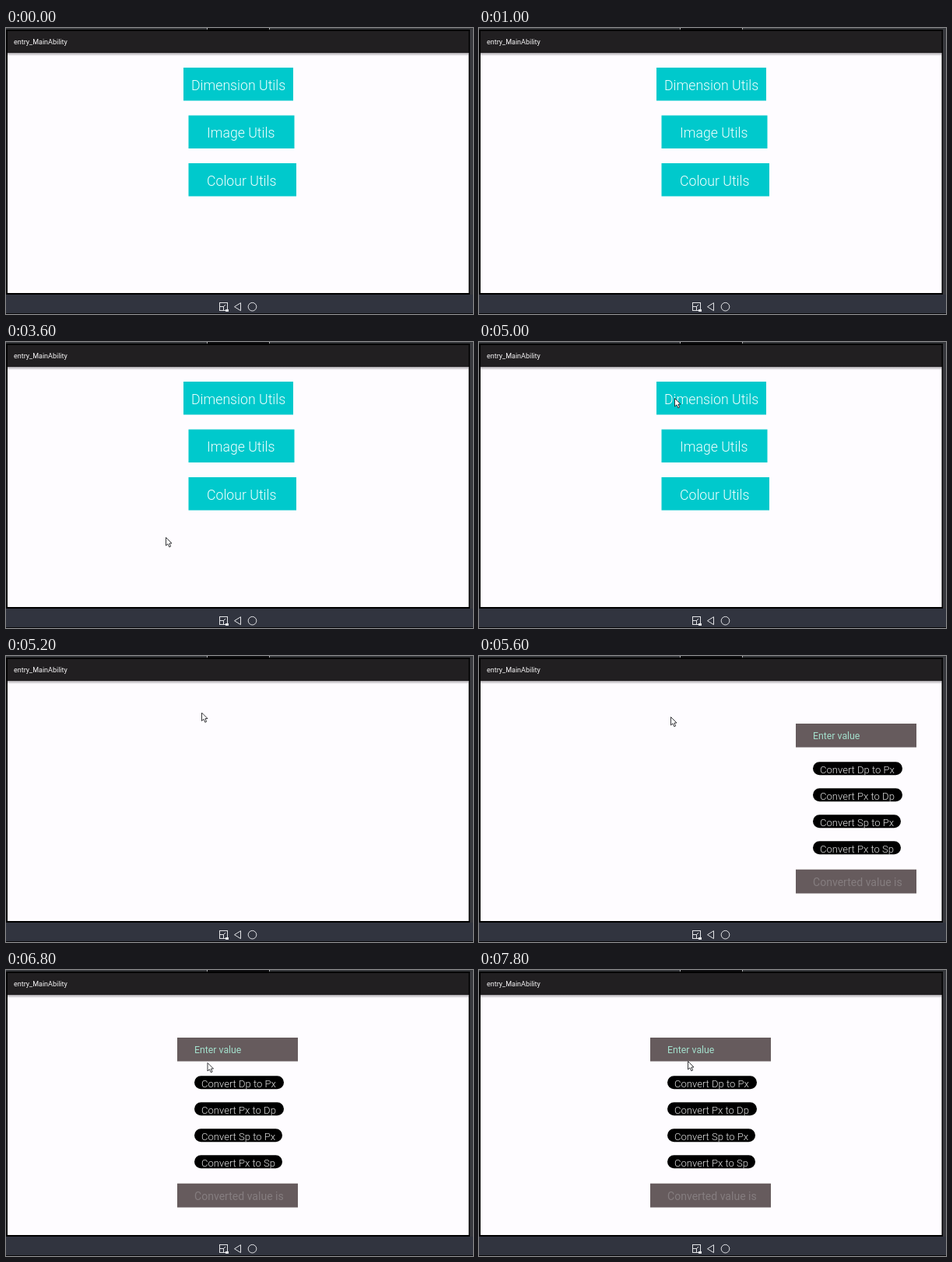
Recreate the animation shown at these times as an HTML page with a canvas. Size 600 px wide and 368 px high, loop 8000 ms.

```html
<!DOCTYPE html>
<html lang="en">
<head>
<meta charset="utf-8">
<title>Utility menu</title>
<style>
html, body { margin: 0; width: 100%; height: 100%; overflow: hidden; background: #31343f; }
canvas { display: block; width: 600px; height: 368px; }
</style>
</head>
<body>
<canvas id="stage"></canvas>
<script>
const LOOP = 8000, STEP = 200;
const MENU_END = 5200, PAGE_START = 5600, PAGE_REST = 5800;
const canvas = document.getElementById('stage');
const ctx = canvas.getContext('2d');
const ratio = window.devicePixelRatio || 1;
canvas.width = 600 * ratio;
canvas.height = 368 * ratio;

// Pointer tip: time, x, y
const path = [
  [2800, 61, 352], [3200, 150, 296], [3600, 205, 251], [4000, 207, 240],
  [4600, 240, 120], [5000, 251, 72], [5400, 251, 73], [5600, 246, 78],
  [6200, 246, 78], [6600, 246, 102], [7000, 271, 136], [7200, 258, 104],
  [7400, 258, 104], [7800, 268, 117]
];

function rect(x, y, w, h, fill) {
  ctx.fillStyle = fill;
  ctx.fillRect(x, y, w, h);
}

function text(str, x, y, size, fill, weight = 400) {
  ctx.font = `${weight} ${size}px Roboto, "Open Sans", sans-serif`;
  ctx.fillStyle = fill;
  ctx.fillText(str, x, y);
}

function poly(points, fill, stroke, width) {
  ctx.beginPath();
  points.forEach(([x, y]) => ctx.lineTo(x, y));
  ctx.closePath();
  if (fill) { ctx.fillStyle = fill; ctx.fill(); }
  ctx.strokeStyle = stroke;
  ctx.lineWidth = width;
  ctx.stroke();
}

function drawNav() {
  ctx.strokeStyle = '#e4e5e8';
  ctx.lineWidth = 1;
  ctx.strokeRect(274.5, 353.5, 10, 10);
  ctx.strokeRect(274.5, 358.5, 5, 5);
  ctx.beginPath();
  ctx.moveTo(279, 359);
  ctx.lineTo(282, 356);
  ctx.stroke();
  rect(282, 362, 4, 3, '#e4e5e8');
  poly([[293.5, 358.7], [301.5, 353.7], [301.5, 363.7]], null, '#e4e5e8', 1);
  ctx.beginPath();
  ctx.arc(316.5, 358.7, 5.3, 0, Math.PI * 2);
  ctx.stroke();
}

function drawFrame() {
  rect(0, 0, 600, 368, '#31343f');
  rect(0, 0, 600, 2, '#35373b');
  rect(259, 0, 80, 2, '#101012');
  rect(258, 0, 1, 2, '#b0b0b2');
  rect(338, 0, 1, 2, '#b0b0b2');
  rect(596, 2, 4, 341, '#38393e');
  rect(0, 2, 596, 341, '#000');
  rect(2, 32, 592.5, 309, '#fefcff');
  rect(2, 4, 592.5, 28, '#211f21');
  const shade = ctx.createLinearGradient(0, 31, 0, 36);
  shade.addColorStop(0, 'rgba(60,56,62,.55)');
  shade.addColorStop(1, 'rgba(60,56,62,0)');
  rect(2, 32, 592.5, 4, shade);
  rect(0, 367, 600, 1, '#08080a');
  text('entry_MainAbility', 10, 20.5, 9, '#f4f3f4');
  drawNav();
}

function drawMenu() {
  [['Dimension Utils', 228, 51, 141, 238],
   ['Image Utils', 234.5, 112.5, 136, 258],
   ['Colour Utils', 234.5, 174, 138.5, 258]].forEach(([label, x, y, w, tx]) => {
    rect(x, y, w, 42.5, '#00c9cc');
    text(label, tx, y + 28.8, 17.7, '#f2ffff', 300);
  });
}

function drawPage(dx) {
  ctx.save();
  ctx.translate(dx, 0);
  rect(220, 87, 155, 30.5, '#665b5d');
  text('Enter value', 242, 107, 12.3, '#a3dfcc');
  ['Dp to Px', 'Px to Dp', 'Sp to Px', 'Px to Sp'].forEach((units, i) => {
    const y = 136.3 + i * 34;
    ctx.fillStyle = '#000';
    ctx.beginPath();
    ctx.roundRect(242, y, i < 2 ? 115 : 113, 17, 8.5);
    ctx.fill();
    ctx.save();
    ctx.clip();
    text('Convert ' + units, 251, y + 14.2, 13.05, '#e2e2e2', 300);
    ctx.restore();
  });
  rect(220, 274.7, 155, 30.8, '#665b5d');
  text('Converted value is', 242, 295.8, 14.05, '#857d7f');
  ctx.restore();
}

function drawPointer(t) {
  if (t < path[0][0]) return;
  let i = path.findIndex(p => p[0] > t);
  if (i < 0) i = path.length;
  const a = path[i - 1], b = path[i] || a;
  const k = b === a ? 0 : (t - a[0]) / (b[0] - a[0]);
  ctx.save();
  ctx.translate(a[1] + (b[1] - a[1]) * k, a[2] + (b[2] - a[2]) * k);
  poly([[.5, .5], [.5, 11], [3, 8.8], [4.8, 12.8], [6.6, 12], [4.9, 8.1], [8, 8]],
    '#fff', '#222226', .9);
  ctx.restore();
}

function draw(now) {
  const t = Math.floor((now % LOOP) / STEP) * STEP;
  ctx.setTransform(ratio, 0, 0, ratio, 0, 0);
  drawFrame();
  if (t < MENU_END) drawMenu();
  else if (t >= PAGE_START) drawPage(t < PAGE_REST ? 187 : 0);
  drawPointer(t);
}

let start;
function tick(now) {
  start ??= now;
  draw(Math.max(0, now - start));
  requestAnimationFrame(tick);
}
draw(0);
requestAnimationFrame(tick);
</script>
</body>
</html>
```
